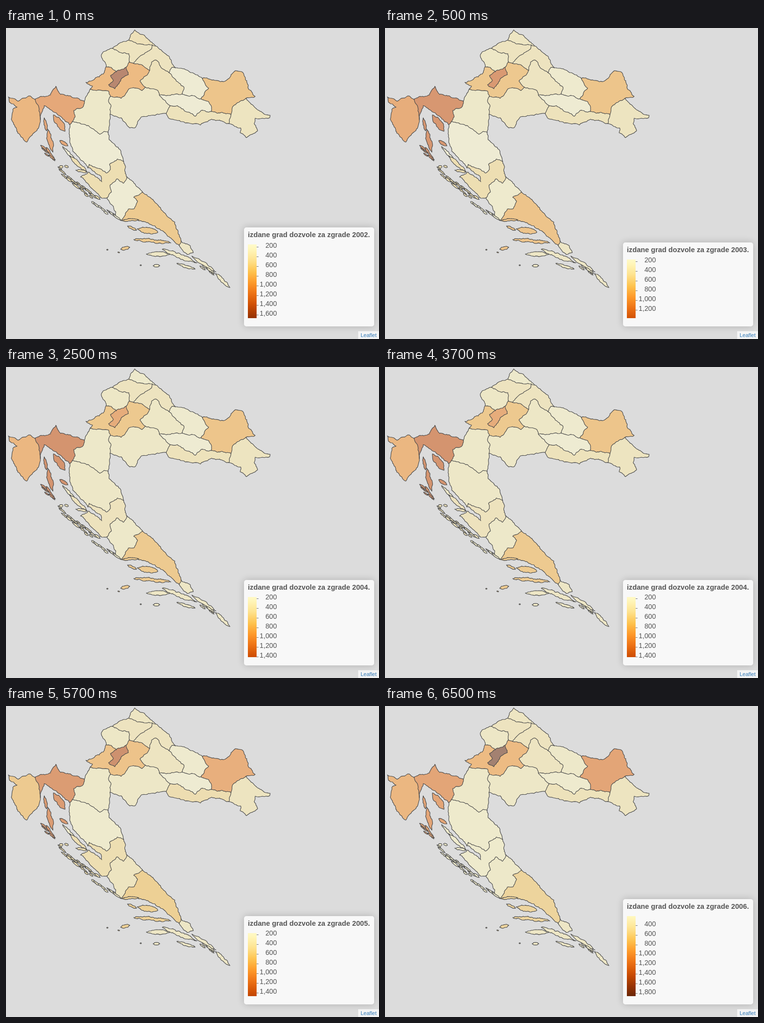
An HTML page with a canvas for the animation above (8 s loop, 771x641 px).

```html
<!DOCTYPE html>
<html lang="hr">
<head>
<meta charset="utf-8">
<title>izdane grad dozvole za zgrade</title>
<style>
html, body { margin: 0; width: 100%; height: 100%; overflow: hidden; background: #dcdcdc; }
body { position: relative; font-family: Arial, "Liberation Sans", sans-serif; }
canvas { position: absolute; left: 0; top: 0; }
#legend { position: absolute; left: 492px; bottom: 26px; width: 269px; border-radius: 5px; color: #555;
  background: rgba(255,255,255,.8); box-shadow: 0 0 15px rgba(0,0,0,.2); }
#legend * { position: absolute; white-space: nowrap; }
#title { left: 8px; top: 6px; font: bold 14.7px/18px Arial, "Liberation Sans", sans-serif; }
#bar { left: 8px; top: 35px; width: 18px; }
.num { right: 201px; font-size: 14.3px; line-height: 18px; }
.tick { left: 26px; width: 4px; height: 1px; background: #777; }
#credit { position: absolute; left: 728px; top: 625px; width: 43px; height: 16px; text-align: center;
  font-size: 11px; line-height: 16px; color: #337ab7; background: rgba(255,255,255,.7); }
</style>
</head>
<body>
<canvas id="map" width="771" height="641"></canvas>
<div id="legend"></div>
<div id="credit">Leaflet</div>
<script>
const BG = [220, 220, 220];
const RAMP = ['ffffe5', 'fff7bc', 'fee391', 'fec44f', 'fe9929', 'ec7014', 'cc4c02', '993404', '662506']
  .map(h => [0, 2, 4].map(i => parseInt(h.substr(i, 2), 16)));
const TOP_VALUE = 1880;

// Points where borders meet
const JOINTS = {
  a: '309,37', b: '302,35', c: '254,25', d: '220,42', e: '264,73', f: '255,70', g: '207,80',
  h: '248,81', i: '228,90', j: '225,125', k: '350,82', l: '337,92', m: '297,87', n: '174,126',
  o: '288,122', p: '216,141', q: '364,136', r: '317,138', s: '406,104', t: '403,146', u: '496,145',
  v: '465,178', w: '424,172', x: '461,197', y: '331,176', z: '339,160', A: '215,178', B: '211,215',
  C: '137,193', D: '162,151', E: '60,147', F: '132,199', G: '71,189', H: '43,235', I: '243,275',
  J: '169,288', K: '250,307', L: '209,350', M: '282,338', N: '238,397', O: '362,439', P: '358,448',
  Q: '387,463'
};

// Bends on the way from one joint to another
const BENDS = {
  ca: '257,15 266,4 284,14', bc: '288,35 272,33', dc: '232,33', be: '301,43 280,56',
  df: '238,51 254,53', gd: '197,58 201,49', gi: '217,81', hj: '253,96 240,103',
  ji: '212,117 222,108 216,98', ak: '332,55 342,68', kl: '343,81', lm: '322,83 310,66 301,70',
  me: '281,76', ng: '179,120 165,112 201,95', mo: '277,109',
  op: '281,129 274,125 258,124 238,145', pn: '212,130 187,129', lq: '348,104 368,122',
  qr: '336,139', ro: '314,129', ks: '362,83 385,92', st: '419,124', tq: '381,140',
  su: '452,110 474,88 487,90 500,122 515,141', uv: '468,163', wt: '424,160 419,152',
  ux: '509,158 517,166 533,177 546,180 545,185 515,186 513,197 520,212 497,226 484,216 485,206',
  xy: '425,188 402,200 352,190 338,187', zw: '354,160 391,182 403,170', zr: '326,148',
  yA: '300,180 280,183 266,206 256,206 238,185', Ap: '217,159 212,152', AB: '214,190',
  BC: '203,213 194,219 176,206', CD: '143,183 140,170 158,164', Dn: '168,138',
  ED: '92,138 103,120 113,137 146,144', FG: '104,175 79,160', GE: '67,160', GH: '68,204 54,221',
  HE: '28,219 11,188 14,168 23,163 7,153 5,142 25,151 50,140', BI: '213,230 236,251',
  IJ: '230,270 214,281 216,291 208,299 172,281', JF: '138,254 131,224',
  KL: '243,320 229,311 215,324 218,338', LJ: '198,351 154,307 170,297 198,317 197,308',
  MN: '264,349 272,357 264,373 253,373', NL: '226,388 227,379', MO: '299,350 330,383 349,400',
  PN: '332,426 308,408 272,396', OQ: '381,449', QP: '375,467'
};

// County: ring of joints and its usual number of permits
const COUNTIES = {
  med: ['abc', 340], var: ['dcbef', 380], kra: ['gdfhi', 300], kop: ['baklme', 380],
  zgz: ['ngijhfemop', 850], zag: ['hji', 1470], bje: ['lqrom', 360], vir: ['kstql', 210],
  osi: ['suvwt', 830], vuk: ['uxv', 370], bro: ['xyzwv', 420], poz: ['zwtqr', 170],
  sis: ['yAporz', 290], kar: ['ABCDnp', 270], pri: ['EDCFG', 1310], ist: ['GHE', 980],
  lik: ['BIJFC', 220], zad: ['IKLJ', 500], sib: ['KMNL', 270], spl: ['MOPN', 770], dub: ['OQP', 310]
};

// What differs from the usual in each year
const YEARS = [
  { med: 450, zgz: 930, zag: 1670, bje: 430, vir: 150, poz: 145, pri: 1150, lik: 150, sib: 160 },
  { zgz: 790, zag: 1340, sis: 360, pri: 1370, ist: 1100, lik: 160, sib: 220, spl: 840 },
  { med: 250, zgz: 780, zag: 1110, bje: 300, pri: 1410, lik: 290, zad: 400 },
  { osi: 1070, bro: 510, ist: 770, sib: 370, spl: 710 },
  { zgz: 940, zag: 1860, osi: 1190, poz: 210, vir: 270, pri: 1190, lik: 230, zad: 230, spl: 650 }
];
const FIRST_YEAR = 2002, STEP = 2000, LEAD = 1500, LOOP = 8000;

// Islands: both ends and the width
const ISLANDS = {
  pri: ['79,185 84,212 6', '86,208 97,256 10', '83,246 101,274 6', '98,179 122,213 15', '111,232 128,243 7'],
  lik: ['117,244 143,272 5'],
  zad: ['131,264 168,297 9', '144,293 168,297 6', '110,286 118,286 6', '121,284 129,287 5'],
  spl: ['271,414 314,421 13', '251,408 270,417 6', '264,436 341,443 8', '237,456 256,452 8',
    '240,397 275,395 5', '208,457 211,457 2', '231,462 235,463 2'],
  dub: ['290,466 340,466 9', '323,456 395,484 9', '384,470 434,503 8', '433,506 463,535 8',
    '353,485 391,497 5', '304,490 318,490 6', '277,489 280,489 2']
};

// Strings of small islets: both ends and how many
const CHAINS = {
  pri: ['74,245 95,268 4'],
  zad: ['106,289 180,351 10', '130,307 194,353 9'],
  sib: ['175,359 230,391 9'],
  dub: ['400,490 431,505 4']
};

let seed = 7;
const rand = () => (seed = seed * 16807 % 2147483647) / 2147483647 - 0.5;
const parse = s => s ? s.split(' ').map(p => p.split(',').map(Number)) : [];
const mix = (a, b, k) => a.map((v, i) => v + (b[i] - v) * k);
const css = c => `rgb(${c.map(Math.round)})`;

// Halves a line again and again, pushing each middle aside
function rough(p, q, amp = 0.2) {
  const dx = q[0] - p[0], dy = q[1] - p[1], len = Math.hypot(dx, dy);
  if (len < 4) return [q];
  const push = rand() * Math.min(amp, 3 / len);
  const mid = [p[0] + dx / 2 - dy * push, p[1] + dy / 2 + dx * push];
  return [...rough(p, mid, amp * 1.3), ...rough(mid, q, amp * 1.3)];
}
const coast = pts => pts.flatMap((p, i) => i ? rough(pts[i - 1], p) : [p]);

function trace(pts, closed) {
  const path = new Path2D();
  pts.forEach(([x, y]) => path.lineTo(x, y));
  if (closed) path.closePath();
  return path;
}

function island([x, y], [u, v], width) {
  const len = Math.hypot(u - x, v - y), nx = (y - v) / len, ny = (u - x) / len;
  const at = (k, side) => {
    const off = side * width / 2 * Math.sqrt(Math.sin(Math.PI * k));
    return [x + (u - x) * k + nx * off, y + (v - y) * k + ny * off];
  };
  return trace(coast([at(0, 0), at(.25, 1), at(.75, 1), at(1, 0), at(.75, -1), at(.25, -1), at(0, 0)]), true);
}

const borders = {};
function border(from, to) {
  const back = borders[to + from];
  if (back) return [...back].reverse();
  const flipped = parse(BENDS[to + from]).reverse();
  return borders[from + to] = borders[from + to] || coast([
    ...parse(JOINTS[from]), ...parse(BENDS[from + to]), ...flipped, ...parse(JOINTS[to])]);
}

const lands = Object.entries(COUNTIES).map(([id, [ring]]) =>
  [id, trace([...ring].flatMap((j, i) => border(j, ring[(i + 1) % ring.length])), true)]);
const lines = Object.values(borders).map(p => trace(p));

const isles = [];
for (const id in ISLANDS)
  for (const s of ISLANDS[id]) {
    const [p, q, [w]] = parse(s);
    isles.push([id, island(p, q, w)]);
  }
for (const id in CHAINS)
  for (const s of CHAINS[id]) {
    const [p, q, [n]] = parse(s);
    for (let i = 0; i < n; i++) {
      const [x, y] = mix(p, q, (i + .5) / n).map(c => c + rand() * 6);
      const r = 6 + rand() * 6;
      isles.push([id, island([x - r, y - r * .75], [x + r, y + r * .75], 3.5 + rand() * 2)]);
    }
  }

function ramp(v) {
  const t = Math.min(1, v / TOP_VALUE) * (RAMP.length - 1);
  const i = Math.min(RAMP.length - 2, Math.floor(t));
  return mix(RAMP[i], RAMP[i + 1], t - i);
}

const ctx = document.getElementById('map').getContext('2d');
const legend = document.getElementById('legend');

function drawMap(permits) {
  ctx.fillStyle = css(BG);
  ctx.fillRect(0, 0, 771, 641);
  ctx.strokeStyle = '#4a4a4a';
  ctx.lineWidth = 1.15;
  ctx.lineJoin = ctx.lineCap = 'round';
  const fill = ([id, path]) => {
    ctx.fillStyle = css(mix(BG, ramp(permits[id]), 0.5));
    ctx.fill(path);
  };
  lands.forEach(fill);
  lines.forEach(p => ctx.stroke(p));
  isles.forEach(isle => { fill(isle); ctx.stroke(isle[1]); });
}

function drawLegend(year, permits) {
  const all = Object.values(permits), min = Math.min(...all), max = Math.max(...all);
  const height = Math.floor((max - min) / 10);
  const stops = Array.from({ length: 17 }, (_, i) => css(ramp(min + (max - min) * i / 16)));
  let html = `<div id="title">izdane grad dozvole za zgrade ${year}.</div>` +
    `<div id="bar" style="height:${height}px;background:linear-gradient(${stops})"></div>`;
  for (let v = Math.ceil(min / 200) * 200; v <= max; v += 200) {
    const y = 35 + Math.floor((v - min) / 10);
    html += `<div class="tick" style="top:${y}px"></div>` +
      `<div class="num" style="top:${y - 12}px">${v.toLocaleString('en-US')}</div>`;
  }
  legend.style.height = height + 52 + 'px';
  legend.innerHTML = html;
}

let shown = -1;
function tick() {
  const i = Math.floor((performance.now() % LOOP + LEAD) / STEP);
  if (i !== shown) {
    shown = i;
    const permits = {};
    for (const id in COUNTIES) permits[id] = YEARS[i][id] || COUNTIES[id][1];
    drawMap(permits);
    drawLegend(FIRST_YEAR + i, permits);
  }
  requestAnimationFrame(tick);
}
tick();
</script>
</body>
</html>
```
